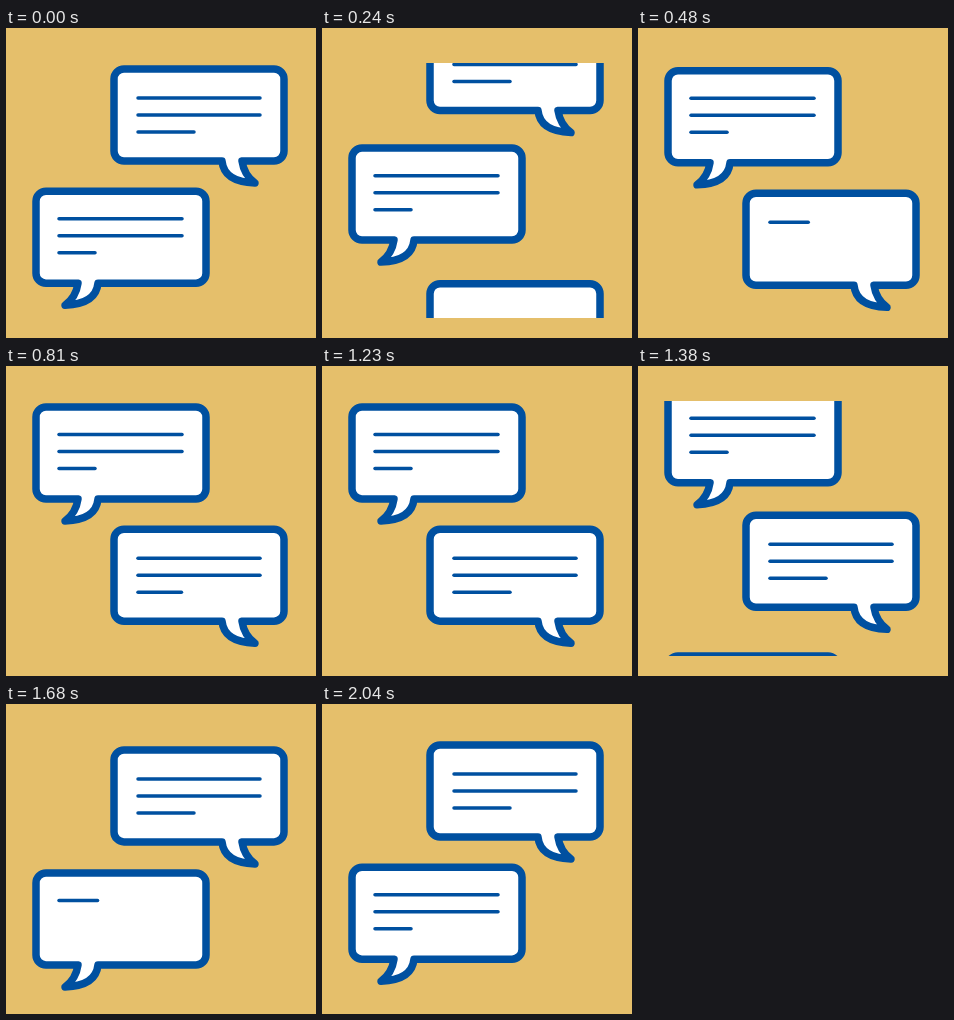
An HTML page with a canvas that plays this animation: 310x310 px, repeating every 2430 ms.

```html
<!DOCTYPE html>
<html>
<head>
<meta charset="utf-8">
<style>
html, body { margin: 0; height: 100%; overflow: hidden; background: #e5bf6b; }
canvas { display: block; }
</style>
</head>
<body>
<canvas id="stage" width="310" height="310"></canvas>
<script>
const ctx = document.getElementById('stage').getContext('2d');
const LOOP = 2430, STEP = 30;
const TOP = 37, MID = 159.2, TRAVEL = 143;
const BLUE = '#0050a0';
const LEFT = { x: 26, flip: false, textX: 53, textY: 31.6, lines: [123, 123, 36] };
const RIGHT = { x: 104, flip: true, textX: 132, textY: 33, lines: [122, 122, 56] };
const PHASES = [
  { outer: RIGHT, inner: LEFT, start: 3, move: 540, write: 438 },
  { outer: LEFT, inner: RIGHT, start: 1217, move: 568, write: 1638 }
];

// Outline with the tail at the lower left, in a box 178 wide
const outline = new Path2D('M14 4H164A10 10 0 0 1 174 14V86A10 10 0 0 1 164 96H66' +
  'Q64 117 33 118Q44 110 46 96H14A10 10 0 0 1 4 86V14A10 10 0 0 1 14 4Z');

const clamp = v => Math.min(1, Math.max(0, v));

// cubic-bezier(.6, 0, .4, 1)
function ease(x) {
  let lo = 0, hi = 1;
  for (let i = 0; i < 24; i++) {
    const u = (lo + hi) / 2, v = 1 - u;
    if (1.8 * u * v * v + 1.2 * u * u * v + u * u * u < x) lo = u; else hi = u;
  }
  return lo * lo * (3 - 2 * lo);
}

// written: number of text lines already drawn, 0 to 3
function bubble(b, y, written = 3) {
  ctx.save();
  ctx.translate(b.flip ? b.x + 178 : b.x, y);
  if (b.flip) ctx.scale(-1, 1);
  ctx.lineWidth = 7.5;
  ctx.fill(outline);
  ctx.stroke(outline);
  ctx.restore();

  ctx.lineWidth = 3.5;
  b.lines.forEach((len, i) => {
    const part = clamp(written - i);
    if (!part) return;
    const ly = y + b.textY + 17 * i;
    ctx.beginPath();
    ctx.moveTo(b.textX, ly);
    ctx.lineTo(b.textX + len * part, ly);
    ctx.stroke();
  });
}

function draw(now) {
  const t = Math.floor(now % LOOP / STEP) * STEP;
  const { outer, inner, start, move, write } = PHASES[t < PHASES[1].start ? 0 : 1];
  const p = ease(clamp((t - start) / move));

  ctx.clearRect(0, 0, 310, 310);
  ctx.save();
  ctx.beginPath();
  ctx.rect(0, 35, 310, 255);
  ctx.clip();
  ctx.fillStyle = '#fff';
  ctx.strokeStyle = BLUE;
  ctx.lineCap = ctx.lineJoin = 'round';
  bubble(outer, TOP - TRAVEL * p);
  bubble(inner, MID + (TOP - MID) * p);
  bubble(outer, MID + TRAVEL * (1 - p), (t - write) / 134);
  ctx.restore();
}

const begin = performance.now();
function tick() {
  draw(performance.now() - begin);
  requestAnimationFrame(tick);
}
tick();
</script>
</body>
</html>
```
